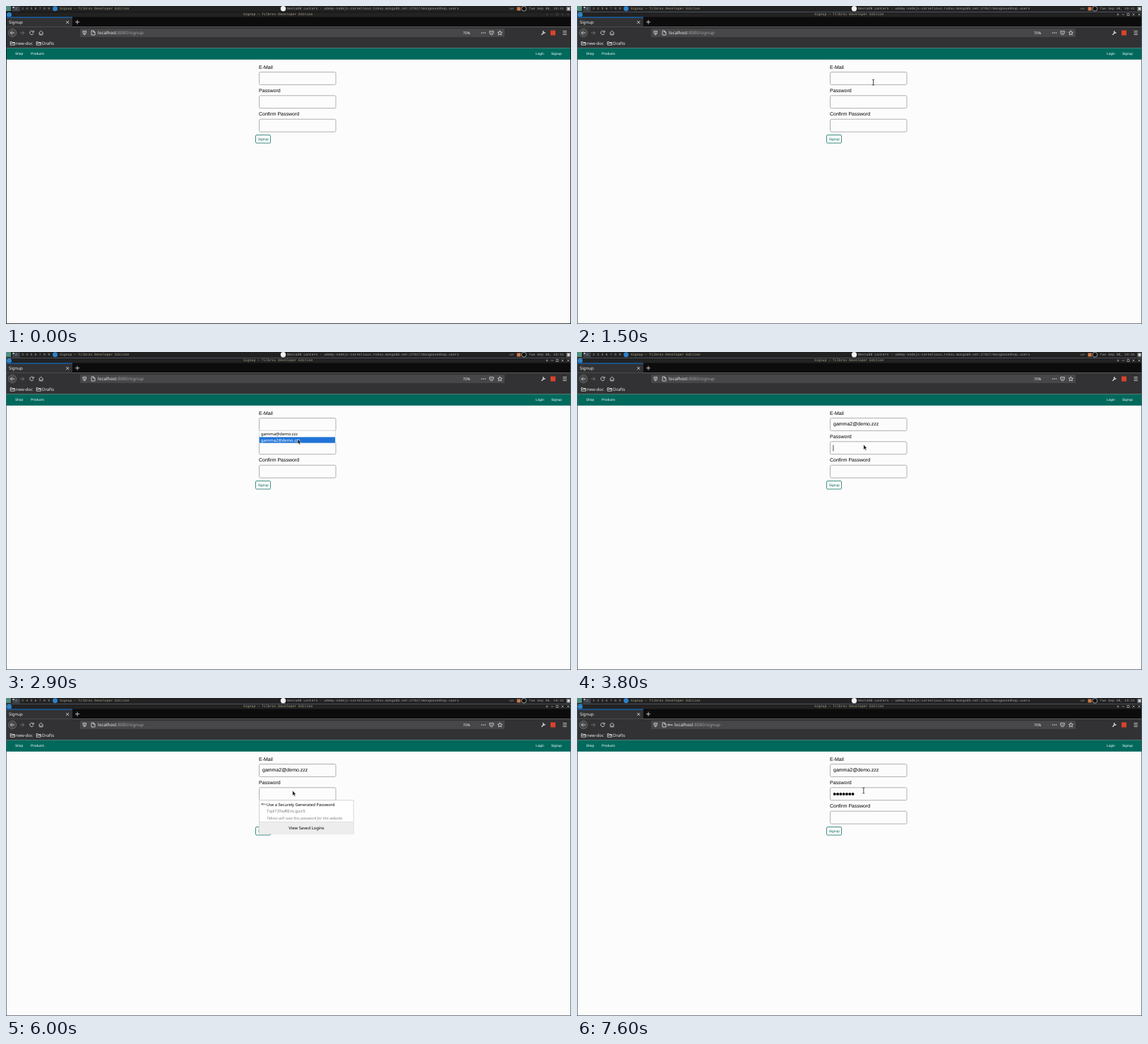
An HTML page for the animation above (8 s loop, 800 by 450 pixels).

```html
<!DOCTYPE html>
<html lang="en">
<head>
<meta charset="utf-8">
<title>Signup</title>
<style>
  html, body { margin: 0; width: 100%; height: 100%; overflow: hidden; background: #fcfcfc; }
  svg { display: block; width: 100vw; height: 100vh; }
  text { font: 6px "Noto Sans", sans-serif; text-rendering: geometricPrecision; white-space: pre; }
  .bar text { font: 4.83px "Liberation Mono", monospace; fill: #a4a4a4; }
  .bar .own { fill: #aca388; }
  .nav text, .btn text { font: 4.8px "Liberation Sans", sans-serif; }
  .nav text { fill: #fff; }
  .form > text { font: 7px "Liberation Sans", sans-serif; }
  .form rect { fill: #fcfcfc; stroke: #b0b0b0; }
  .icon { fill: none; stroke: #d2d2d4; stroke-width: .9; }
  .chrome text { fill: #f0f0f2; }
  .caret { stroke: #222; stroke-width: .8; }
  .pop text { font-size: 5.85px; }
</style>
</head>
<body>
<svg viewBox="0 0 800 450">
  <rect width="800" height="450" fill="#fcfcfc"/>

  <g class="bar">
    <rect width="800" height="16" fill="#222"/>
    <rect width="7" height="7" fill="#4f8f80"/>
    <rect x="9" y=".5" width="10.5" height="7" fill="#3e444c"/>
    <rect x="9.5" y="1" width="2" height="2" fill="#ccc"/>
    <text x="13" y="5.2">2</text>
    <g id="tags"></g>
    <circle cx="69.5" cy="3.8" r="3.5" fill="#2c83c9"/>
    <text class="own" x="76" y="5.2">Signup — Tilbrox Developer Edition</text>
    <circle cx="392.5" cy="3.8" r="3.7" fill="#f4f4f4"/>
    <text x="398" y="5.2">NestaDB Lantern - udemy-nodejs-cornelious.ts0xu.mongodb.net:27017/mongooseShop.users</text>
    <text x="713" y="5.2">us</text>
    <rect x="723.5" y="1.5" width="5" height="5" fill="#d0794a"/>
    <circle cx="733.3" cy="3.8" r="3.4" fill="#111" stroke="#ccc" stroke-width=".7"/>
    <text x="740.5" y="5.2">Tue Sep 08, 18:41</text>
    <rect x="793.5" y="1" width="6" height="6" fill="#777"/>
    <path d="M795 2.5h3v3h-3z" fill="#ddd"/>
    <circle cx="4.5" cy="12.3" r="3.5" fill="#2c83c9"/>
    <text class="own" x="336" y="13.3">Signup — Tilbrox Developer Edition</text>
    <path id="controls" fill="none" stroke-width=".8"
      d="M764.5 12h3m-1.5-1.5v3M772 11.2l1.4 1.6 1.4-1.6M779 10.5h3v3h-3zM786.5 10.5l3 3m0-3l-3 3M794.5 10.5l3 3m0-3l-3 3"/>
  </g>

  <g class="chrome">
    <rect y="15.6" width="800" height="13.8" fill="#0c0c0d"/>
    <rect y="29.4" width="800" height="30.2" fill="#323234"/>
    <rect x="1" y="15.6" width="93" height="13.8" fill="#323234"/>
    <rect x="1" y="15.6" width="93" height=".85" fill="#0a84ff"/>
    <text x="4" y="25">Signup</text>
    <path class="icon" d="M85.2 21l4 4m0-4l-4 4M98 22.7h6m-3-3v6"/>
    <circle cx="9" cy="38" r="5.8" fill="#48484b" stroke="#77777a" stroke-width=".6"/>
    <path class="icon" d="M12 38H6.3m2.5-2.5L6.3 38l2.5 2.5"/>
    <path class="icon" style="stroke:#77777a" d="M20 38h5.7m-2.5-2.5l2.5 2.5-2.5 2.5"/>
    <path class="icon" d="M38.7 36.5a2.7 2.7 0 1 0 .2 2.4M39.2 34.8v2.4h-2.4M46.4 38.2l3.2-3 3.2 3M47.3 37.8v3h4.6v-3M49.6 40.8v-2"/>
    <rect x="105" y="32" width="601" height="12" rx="1.2" fill="#474749"/>
    <path class="icon" d="M108.8 35.6q2.2 0 2.4-.6.2.6 2.4.6 0 4.2-2.4 5.5-2.4-1.3-2.4-5.5zM111.2 36v4M121 35h3l2 2v4h-5zM123.8 35v2.2h2.2"/>
    <g id="urlKey" class="icon"><circle cx="129.7" cy="38" r="1.1"/><path d="M131 38h4.2v1.2M133.4 38v1"/></g>
    <text id="url" y="40.2" style="font-size:6.28px">localhost<tspan fill="#a0a0a3">:8080/signup</tspan></text>
    <text x="647" y="39.9" style="font-size:5.2px">70%</text>
    <g fill="#d2d2d4"><circle cx="673.5" cy="38" r=".8"/><circle cx="676" cy="38" r=".8"/><circle cx="678.5" cy="38" r=".8"/></g>
    <path class="icon" d="M684.7 35.6h5.6v2.2q-.5 2.6-2.8 3-2.3-.4-2.8-3zM686 37.4l1.5 1.4 1.5-1.4M699.3 34.8l.9 2.2 2.3.2-1.8 1.5.6 2.3-2-1.2-2 1.2.6-2.3-1.8-1.5 2.3-.2zM788.5 35.6h5.4m-5.4 2.4h5.4m-5.4 2.4h5.4"/>
    <path class="icon" style="stroke-width:1.5" d="M758.3 40.7l3-3m.2-2.3a1.4 1.4 0 1 0 1.7 1.7"/>
    <rect x="771" y="34.5" width="7" height="7" fill="#d8432c"/>
    <path class="icon" d="M6.2 55.2v-4.7h2l.8 1h3.4v3.7zM6.2 52.6h6.2M43.2 55.2v-4.7h2l.8 1h3.4v3.7zM43.2 52.6h6.2"/>
    <text x="14" y="55">new-doc</text>
    <text x="51" y="55">Drafts</text>
  </g>

  <g class="nav">
    <rect y="59.6" width="800" height="16.2" fill="#00695c"/>
    <text x="13" y="69">Shop</text><text x="35" y="69">Products</text>
    <text x="750" y="69">Login</text><text x="772" y="69">Signup</text>
  </g>

  <g class="form">
    <text x="358" y="88.5">E-Mail</text>
    <text x="358" y="121.5">Password</text>
    <text x="358" y="155">Confirm Password</text>
    <rect x="358.5" y="93.5" width="108.5" height="17.9" rx="1.8"/>
    <rect x="358.5" y="126.8" width="108.5" height="17.9" rx="1.8"/>
    <rect x="358.5" y="160.2" width="108.5" height="17.9" rx="1.8"/>
    <text id="email" x="363" y="104.2">gamma2@demo.zzz</text>
    <g id="dots"></g>
  </g>
  <g class="btn">
    <rect x="353.5" y="182.5" width="21" height="11.5" rx="1.4" fill="#fcfcfc" stroke="#00695c" stroke-width=".75"/>
    <text x="356.8" y="190" fill="#00695c">Signup</text>
  </g>
  <path id="caret" class="caret"/>

  <g id="list" class="pop">
    <rect x="358.5" y="111.2" width="107.7" height="17.6" fill="#fff" stroke="#d5d5d5" stroke-width=".7"/>
    <rect id="pick" x="358.6" y="120.4" width="107.4" height="8.2" fill="#1f74d8"/>
    <text x="361" y="118.4">gamma@demo.zzz</text>
    <text id="second" x="361" y="126.7">gamma2@demo.zzz</text>
  </g>

  <g id="saver" class="pop">
    <rect x="358.5" y="144.7" width="133.6" height="47.3" fill="#fff" stroke="#ccc" stroke-width=".8"/>
    <path d="M358.9 175.4h132.8v16.2H358.9z" fill="#ededed"/>
    <path d="M358.9 175.4h132.8" stroke="#d4d4d4" stroke-width=".7"/>
    <g fill="none" stroke="#555" stroke-width=".8"><circle cx="362.8" cy="150.2" r="1.1"/><path d="M364 150.2h3.6v1.1"/></g>
    <text x="369" y="152.8" style="font-size:5.75px">Use a Securely Generated Password</text>
    <text x="369" y="161.8" style="font:6.1px 'Liberation Mono',monospace" fill="#808080">Tqd72hwREnLgux5</text>
    <text x="369" y="172" style="font-size:5.25px;font-style:italic" fill="#808080">Tilbrox will save this password for this website.</text>
    <text x="425.5" y="185.8" text-anchor="middle">View Saved Logins</text>
  </g>

  <path id="arrow" d="M0 0v7.2l1.6-1.4 1.1 2.4 1.2-.6-1.1-2.3h2z" fill="#111" stroke="#fff" stroke-width=".5"/>
  <path id="beam" d="M-1.5-4q1.5 0 1.5.8v6.4q0 .8-1.5.8M1.5-4Q0-4 0-3.2M0 3.2q0 .8 1.5.8" fill="none" stroke="#222" stroke-width=".8"/>
  <rect id="border" x=".4" y="8.4" width="799.2" height="441.2" fill="none" stroke-width=".8"/>
</svg>
<script>
const $ = id => document.getElementById(id);
const show = (id, on) => $(id).style.display = on ? '' : 'none';
const within = (t, a, b) => t >= a && t < b;

for (let n = 3; n <= 9; n++)
  $('tags').innerHTML += `<text x="${22 + (n - 3) * 6.2}" y="5.2">${n}</text>`;

const DOT = 4.3, FIELD = 362.6;
for (let k = 0; k < 7; k++)
  $('dots').innerHTML += `<circle cx="${FIELD + DOT * (k + .5)}" cy="135.9" r="1.95"/>`;

// Pointer moves: start, number of 100 ms steps, from, to
const moves = [
  [200, 8, [790, 246], [419.5, 108]],
  [2200, 3, [420, 107.5], [413, 123]],
  [3300, 2, [413, 123], [405.8, 131]]
];
// When the password gains characters, and its new length
const keys = [[6300, 1], [6400, 2], [6700, 3], [6900, 5], [7100, 6], [7400, 7]];

function pointer(t) {
  const [start, steps, a, b] = moves.filter(m => t >= m[0]).pop() || moves[0];
  const p = Math.min(1, Math.max(0, ((t - start) / 100 + (start > 200)) / (steps - (start === 200))));
  const e = 1 - (1 - p) ** 2;
  return a.map((v, i) => v + (b[i] - v) * e);
}

function caret(t, typed) {
  if (within(t, 1600, 2700)) return [362.9, 98];
  if (within(t, 3100, 3800)) return [426, 98];
  if (within(t, 3800, 5200)) return [362.9, 131.7];
  if (within(t, 6300, 7600)) return [FIELD + DOT * typed + .5, 131.7];
}

function draw(t) {
  const typed = keys.reduce((n, [at, count]) => t >= at ? count : n, 0);
  const [x, y] = pointer(t);
  const beam = within(t, 900, 2000) || t >= 6300;
  const focused = t >= 1500;
  for (const id of ['arrow', 'beam']) $(id).setAttribute('transform', `translate(${x} ${y})`);
  show('arrow', t >= 200 && !beam);
  show('beam', beam);

  $('controls').setAttribute('stroke', focused ? '#a4a4a4' : '#444');
  $('border').setAttribute('stroke', focused ? '#535d6c' : '#111');
  show('list', within(t, 2000, 3100));
  show('pick', t >= 2900);
  $('second').setAttribute('fill', t >= 2900 ? '#fff' : '#000');
  show('email', t >= 3100);
  show('saver', within(t, 3900, 6300));
  show('urlKey', t >= 6400);
  $('url').setAttribute('x', t >= 6400 ? 138 : 130);
  [...$('dots').children].forEach((dot, k) => dot.style.display = k < typed ? '' : 'none');

  const c = caret(t, typed);
  $('caret').setAttribute('d', c ? `M${c[0]} ${c[1]}v8.6` : '');
}

function frame() {
  draw(Math.floor(performance.now() % 8000 / 100) * 100);
  requestAnimationFrame(frame);
}
frame();
</script>
</body>
</html>
```
